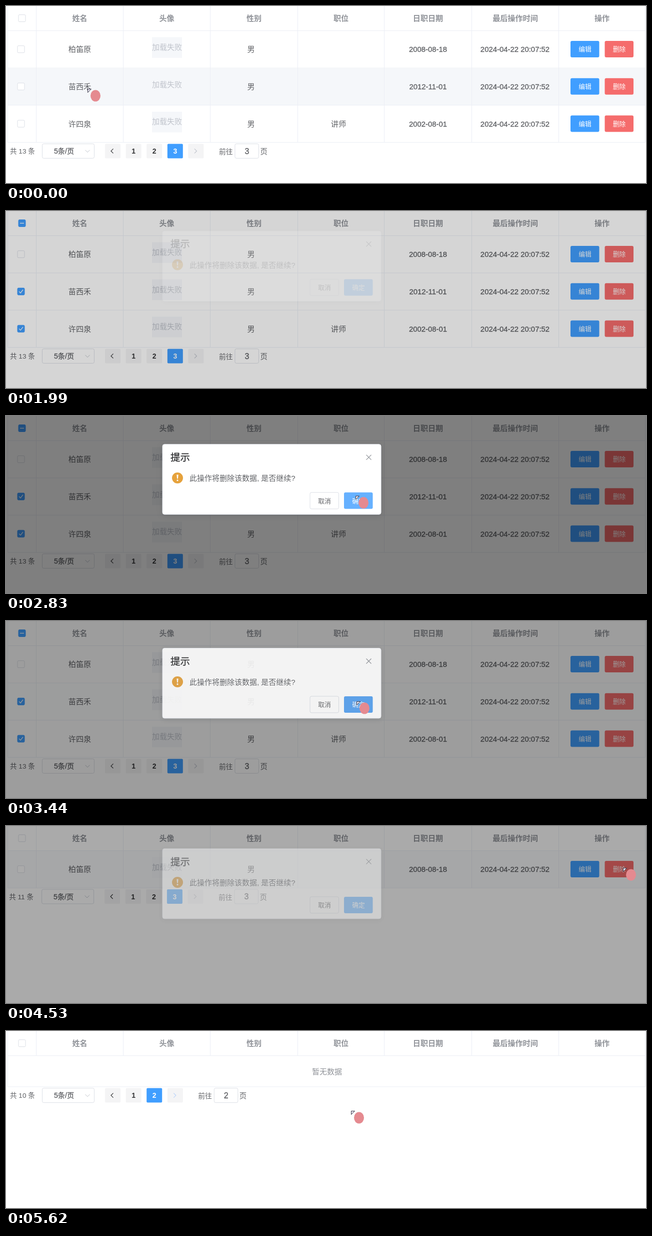
Write an HTML page that moves like this. It is 1280 px wide and 355 px high and loops after 5690 ms.

```html
<!DOCTYPE html>
<html lang="zh-CN">
<head>
<meta charset="utf-8">
<title>批量删除</title>
<style>
  html, body { margin: 0; width: 100%; height: 100%; overflow: hidden; background: #fff; }
  svg { display: block; width: 1280px; height: 355px; font-family: 'Liberation Sans', 'Noto Sans CJK SC', 'Noto Sans CJK', sans-serif; font-weight: 300; }
  text { white-space: pre; }
  .check rect { fill: #fff; stroke: #dcdfe6; }
  .check path { fill: none; stroke: #fff; stroke-width: 1.3; display: none; }
  .check.hover rect { stroke: #409eff; }
  .check.on rect, .check.half rect { fill: #409eff; stroke: #409eff; }
  .check.on .tick, .check.half .dash { display: inline; }
</style>
</head>
<body>
<svg id="stage" viewBox="0 0 1280 355"></svg>
<script>
const LOOP = 5690;
const ROW = 74.7, HEAD = 49.5;
const COLUMNS = [3.5, 60.5, 234.5, 408.5, 583.5, 756.5, 931.5, 1105.5, 1278.5];
const TITLES = ['姓名', '头像', '性别', '职位', '日职日期', '最后操作时间', '操作'];
const PEOPLE = [
  { name: '柏笛原', job: '', date: '2008-08-18' },
  { name: '苗西禾', job: '', date: '2012-11-01' },
  { name: '许四泉', job: '讲师', date: '2002-08-01' }
];

// Pointer stops: time, x, y
const PATH = [
  [0, 163, 166], [40, 163, 166], [600, 25, 160], [790, 25, 160], [1150, 25, 236],
  [1310, 25, 236], [1720, 180, -40], [2300, 180, -40], [2810, 699, 160], [2930, 699, 160],
  [3040, 701, 161], [3470, 701, 161], [4340, 1234, 84], [4570, 1234, 84], [5110, 694, 164],
  [5310, 694, 164], [5600, 690, 160], [LOOP, 690, 160]
];
const PRESSES = [[690, 755], [1235, 1295], [3365, 3405], [4390, 4450], [5205, 5245]];
const MODALS = [[1948, 3407], [4453, 5247]];
const CHECKED_AT = [Infinity, 755, 1295];
const RELOADS = [3505, 5345];

const line = (x1, y1, x2, y2, color = '#ebeef5') =>
  `<path d="M${x1} ${y1}L${x2} ${y2}" stroke="${color}"/>`;
const rect = (x, y, w, h, fill, r = 0, extra = '') =>
  `<rect x="${x}" y="${y}" width="${w}" height="${h}" rx="${r}" fill="${fill}" ${extra}/>`;
const text = (x, y, s, size, fill, extra = '') =>
  `<text x="${x}" y="${y + size * 0.37}" font-size="${size}" fill="${fill}" text-anchor="middle" ${extra}>${s}</text>`;
const medium = color => `stroke="${color}" stroke-width=".35"`;
const LEFT = 'style="text-anchor:start"';

const button = (x, y, label, fill, color = '#fff', extra = '') =>
  rect(x, y, 57.5, 33, fill, 3, extra) + text(x + 29, y + 16.5, label, 12.8, color);

const check = (x, y, id) => `<g class="check" id="${id}" transform="translate(${x} ${y})">
  <rect x="-7" y="-7" width="14" height="14" rx="2"/>
  <path class="tick" d="M-4 0L-1 3L4 -3.5"/><path class="dash" d="M-4 0H4"/></g>`;

const chevron = (x, y, dir, color) =>
  `<path d="M${x - 2 * dir} ${y - 4.5}l${4.5 * dir} 4.5l${-4.5 * dir} 4.5" fill="none" stroke="${color}" stroke-width="1.2"/>`;

function row(person, i, scene) {
  const top = HEAD + i * ROW, y = top + 37.2, ink = '#606266';
  return rect(3.5, top, 1275, ROW, '#f5f7fa', 0, `id="hover${scene}${i}"`)
    + check(30, y, `check${scene}${i}`)
    + text(147.5, y, person.name, 15.2, ink)
    + rect(292, top + 13, 60, 41.5, '#f5f7fa')
    + text(322, top + 33, '加载失败', 15, '#c0c4cc')
    + text(490, y, '男', 15, ink)
    + text(665, y, person.job, 15.2, ink)
    + text(844, y, person.date, 14.9, ink, medium(ink))
    + text(1018, y, '2024-04-22 20:07:52', 14.9, ink, medium(ink))
    + button(1129, top + 20.5, '编辑', '#409eff')
    + button(1197.5, top + 20.5, '删除', '#f56c6c', '#fff', `id="remove${scene}${i}"`)
    + line(3.5, top + ROW, 1278.5, top + ROW);
}

function pager(y, total, page, pages, shift, nextColor) {
  const ink = '#606266', dark = '#303133', step = 41.6;
  const slot = i => 198 + i * step;
  let out = text(8 - shift, y, `共 ${total} 条`, 13.6, ink, LEFT)
    + rect(72.5, y - 14.5, 104, 29, '#fff', 3, 'stroke="#dcdfe6"')
    + text(116, y, '5条/页', 14.2, ink, medium(ink))
    + `<path d="M158.5 ${y - 2}l4.5 4.5l4.5 -4.5" fill="none" stroke="#c0c4cc"/>`;
  for (let i = 0; i <= pages + 1; i++) {
    const x = slot(i), active = i === page;
    out += rect(x, y - 14.5, 31, 29, active ? '#409eff' : '#f4f4f5', 2);
    if (i === 0) out += chevron(x + 14.5, y, -1, dark);
    else if (i > pages) out += chevron(x + 14.5, y, 1, nextColor);
    else out += text(x + 15.5, y, i, 14, active ? '#fff' : dark, 'font-weight="700"');
  }
  const x = slot(pages + 1);
  out += text(x + 61.5, y + 1, '前往', 13.8, ink, LEFT)
    + rect(x + 93.5, y - 14.5, 47.5, 29, '#fff', 3, 'stroke="#dcdfe6"')
    + text(x + 117.5, y, page, 16, ink, medium(ink))
    + text(x + 144, y + 1, '页', 14.4, ink, LEFT);
  return `<g transform="translate(${-shift} 0)">${out}</g>`;
}

function table(scene, people, total, page, pages, shift, nextColor = '#c0c4cc') {
  const bottom = people.length ? HEAD + people.length * ROW : 111.8;
  const body = people.map((p, i) => row(p, i, scene)).join('')
    || text(642, 81, '暂无数据', 15, '#909399') + line(3.5, bottom, 1278.5, bottom);
  const bars = COLUMNS.map((x, i) =>
    line(x, 0, x, people.length || i % 8 === 0 ? bottom : HEAD)).join('');
  const heads = TITLES.map((t, i) =>
    text((COLUMNS[i + 1] + COLUMNS[i + 2]) / 2, 24, t, 15.1, '#909399', 'font-weight="700"')).join('');
  return `<g id="scene${scene}">${body}${bars}${line(3.5, HEAD, 1278.5, HEAD)}${heads}
    ${check(32, 24.5, 'all' + scene)}${pager(bottom + 17.3, total, page, pages, shift, nextColor)}</g>`;
}

const dialog = `<g id="dialog">
  ${rect(313, 54.5, 437, 140.5, '#fff', 4, 'stroke="#ebeef5" style="filter:drop-shadow(0 2px 6px rgba(0,0,0,.12))"')}
  ${text(348.5, 80.5, '提示', 19.4, '#303133', medium('#303133'))}
  <path d="M720.5 75.5l10 10m0 -10l-10 10" stroke="#909399" stroke-width="1.2"/>
  <circle cx="343" cy="122" r="11" fill="#e6a23c"/>
  <path d="M341.3 115.5h3.4l-.8 8h-1.8z" fill="#fff"/><circle cx="343" cy="126.7" r="1.6" fill="#fff"/>
  ${text(367, 122.5, '此操作将删除该数据, 是否继续?', 15, '#606266', LEFT)}
  ${button(608, 151, '取消', '#fff', '#606266', 'stroke="#dcdfe6"')}
  ${button(676, 151, '确定', '#66b1ff', '#fff', 'id="confirm"')}</g>`;

const pointer = `<g id="pointer">
  <circle id="press" cx="0" cy="0" r="12.5" fill="#fff000" fill-opacity=".55"/>
  <path d="M.5 .5h7l-7 7z" fill="#e2dfec" stroke="#3c3c4c"/>
  <ellipse cx="16" cy="14" rx="10" ry="11.5" fill="#e58a90"/></g>`;

document.getElementById('stage').innerHTML =
  table(0, PEOPLE, 13, 3, 3, 0) + table(1, PEOPLE.slice(0, 1), 11, 3, 3, 0.9)
  + table(2, [], 10, 2, 2, 0, '#b9d3fa')
  + `<rect id="shade" width="1280" height="355"/>` + dialog + pointer;

const el = Object.fromEntries([...document.querySelectorAll('[id]')].map(n => [n.id, n]));
const clamp = v => Math.min(1, Math.max(0, v));
const within = (t, [from, to]) => t >= from && t < to;

// CSS "ease": cubic-bezier(.25, .1, .25, 1)
function ease(x) {
  if (x <= 0 || x >= 1) return clamp(x);
  const bezier = (a, b, u) => 3 * a * u * (1 - u) ** 2 + 3 * b * u * u * (1 - u) + u ** 3;
  let lo = 0, hi = 1;
  for (let i = 0; i < 20; i++) {
    const mid = (lo + hi) / 2;
    if (bezier(0.25, 0.25, mid) < x) lo = mid; else hi = mid;
  }
  return bezier(0.1, 1, lo);
}

function pointerAt(t) {
  t = Math.max(0, t);
  let i = 1;
  while (i < PATH.length - 1 && PATH[i][0] <= t) i++;
  const [t0, x0, y0] = PATH[i - 1], [t1, x1, y1] = PATH[i];
  const u = clamp((t - t0) / (t1 - t0)), k = u * u * (3 - 2 * u);
  return [x0 + (x1 - x0) * k, y0 + (y1 - y0) * k];
}

const fade = (t, duration) => MODALS.reduce((sum, [open, close]) =>
  sum + ease((t - open) / duration) - ease((t - close) / duration), 0);

function hoveredRow(t) {
  const y = pointerAt(t)[1];
  return MODALS.some(m => within(t, m)) ? -1 : Math.floor((y - HEAD) / ROW);
}

// Averaging the recent past gives the 250 ms background transition.
function hoverAmount(t, i) {
  let hits = 0;
  for (let k = 0; k < 10; k++) hits += hoveredRow(t - k * 25) === i;
  return hits / 10;
}

function draw(t) {
  const scene = RELOADS.filter(r => t >= r).length;
  const [px, py] = pointerAt(t);
  for (let s = 0; s < 3; s++) el['scene' + s].style.display = s === scene ? '' : 'none';

  const count = [3, 1, 0][scene];
  for (let i = 0; i < count; i++) {
    el[`hover${scene}${i}`].style.opacity = hoverAmount(t, i);
    const on = scene === 0 && t >= CHECKED_AT[i];
    const near = px < 38 && hoveredRow(t) === i;
    el[`check${scene}${i}`].setAttribute('class', 'check' + (on ? ' on' : near ? ' hover' : ''));
  }
  el.all0.setAttribute('class', t >= CHECKED_AT[1] ? 'check half' : 'check');
  el.remove10.setAttribute('fill', t > 4560 ? '#f78989' : '#f56c6c');

  const shown = fade(t, 300);
  el.shade.style.opacity = 0.5 * fade(t, 200);
  el.dialog.style.opacity = shown;
  el.dialog.setAttribute('transform', `translate(0 ${2.3 - 20 * (1 - shown)})`);
  el.confirm.setAttribute('fill', MODALS.some(m => t >= m[1] - 40 && t < m[1] + 300) ? '#55a2f3' : '#66b1ff');

  el.pointer.setAttribute('transform', `translate(${Math.round(px)} ${Math.round(py)})`);
  el.press.style.display = PRESSES.some(p => within(t, p)) ? '' : 'none';
}

const start = performance.now();
function tick() {
  draw((performance.now() - start) % LOOP);
  requestAnimationFrame(tick);
}
tick();
</script>
</body>
</html>
```
